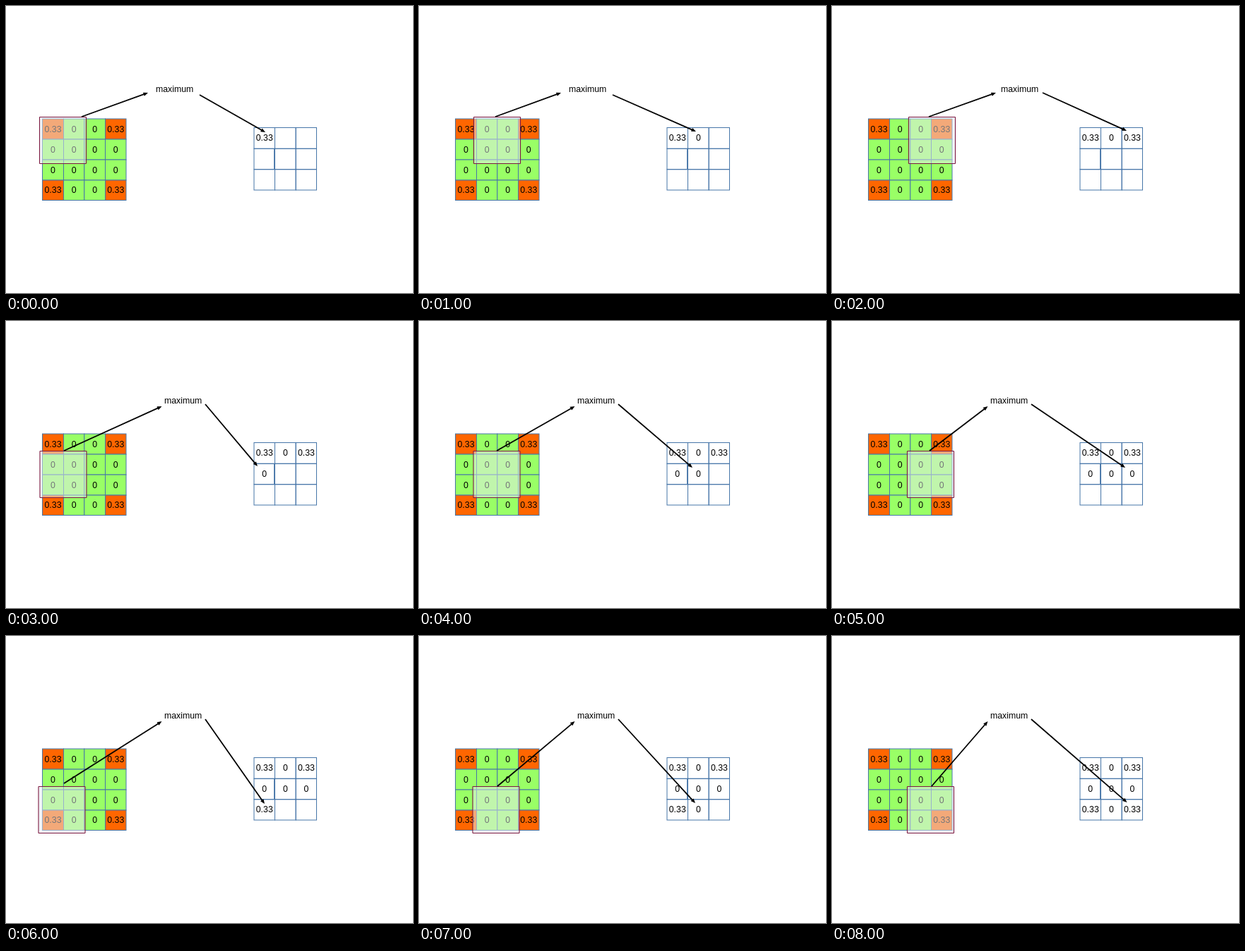
These frames come from a looping animation (576 px wide and 407 px high, 9000 ms). An HTML page:

```html
<!DOCTYPE html>
<html lang="en">
<head>
<meta charset="utf-8">
<title>Max pooling</title>
<style>
  html, body { margin: 0; width: 100%; height: 100%; overflow: hidden; background: #fff; }
  svg { display: block; width: 576px; height: 407px; }
  text { font: 12.3px "Liberation Sans", Arial, sans-serif; fill: #000; }
  .cell { stroke: #4676a8; stroke-width: 1; }
  #win { fill: #e8ecf2; fill-opacity: .5; stroke: #7c1840; stroke-width: 1.1; }
  .arrow line { stroke: #000; stroke-width: 1.8; }
</style>
</head>
<body>
<svg viewBox="0 0 576 407">
  <g id="input"></g>
  <g id="output"></g>
  <rect id="win" width="66" height="66" rx=".5"/>
  <g class="arrow" id="up"><line/><path/></g>
  <g class="arrow" id="down"><line/><path/></g>
  <text id="label">maximum</text>
</svg>
<script>
const STEP = 1000;

// window corner, label baseline start, up arrow, down arrow
const steps = [
  { win: [47.5, 157.5], label: [212, 122], up: [107, 157, 201, 123], down: [274, 126, 367, 179] },
  { win: [77.5, 157.5], label: [212, 122], up: [108, 157, 201, 123], down: [274, 126, 392, 178] },
  { win: [108.5, 157.5], label: [239, 122], up: [137, 157, 232, 123], down: [298, 123, 417, 177] },
  { win: [48, 184.5], label: [224, 117], up: [82, 184, 220.5, 121], down: [282, 118, 356, 206] },
  { win: [77, 184.5], label: [224, 117], up: [110, 184, 220.5, 121], down: [282, 118, 387, 208] },
  { win: [106.5, 184.5], label: [224, 117], up: [138, 184, 220.5, 121], down: [282, 118, 415, 208] },
  { win: [46, 213.5], label: [224, 117], up: [82, 209, 220.5, 121], down: [282, 118, 366, 238] },
  { win: [76, 213.5], label: [224, 117], up: [111, 213, 220.5, 121], down: [282, 118, 391, 237] },
  { win: [106.5, 213.5], label: [224, 117], up: [141, 213, 220.5, 121], down: [282, 118, 417.5, 236] }
];

const $ = id => document.getElementById(id);

function set(el, attrs) {
  for (const key in attrs) el.setAttribute(key, attrs[key]);
  return el;
}

function add(parent, tag, attrs) {
  const el = document.createElementNS("http://www.w3.org/2000/svg", tag);
  return parent.appendChild(set(el, attrs));
}

// Draws a square grid and returns its number labels in reading order.
function grid(parent, xs, ys, value, fill) {
  const n = xs.length - 1;
  const labels = [];
  for (let i = 0; i < n * n; i++) {
    const c = i % n, r = Math.floor(i / n);
    const corner = (r === 0 || r === n - 1) && (c === 0 || c === n - 1);
    add(parent, "rect", {
      class: "cell", x: xs[c], y: ys[r],
      width: xs[c + 1] - xs[c], height: ys[r + 1] - ys[r], fill: fill(corner)
    });
    const text = add(parent, "text", {
      x: (xs[c] + xs[c + 1]) / 2, y: (ys[r] + ys[r + 1]) / 2 + 4, "text-anchor": "middle"
    });
    text.textContent = value(corner);
    labels.push(text);
  }
  return labels;
}

const value = corner => corner ? "0.33" : "0";
grid($("input"), [51.5, 81.5, 110.8, 140.5, 170], [160, 189, 218, 247, 275.5],
  value, corner => corner ? "#ff6600" : "#99ff66");
const results = grid($("output"), [351, 380.5, 410.2, 439.5], [172.5, 202.3, 231.7, 261],
  value, () => "none");
add($("output"), "line", { class: "cell", x1: 379.6, x2: 379.6, y1: 202, y2: 231.5 });

function arrow(g, [x1, y1, x2, y2]) {
  const a = Math.atan2(y2 - y1, x2 - x1);
  set(g.children[0], { x1, y1, x2: x2 - 4 * Math.cos(a), y2: y2 - 4 * Math.sin(a) });
  set(g.children[1], {
    d: "M0 0L-6.5 -2.7V2.7Z",
    transform: `translate(${x2} ${y2}) rotate(${a * 180 / Math.PI})`
  });
}

let shown = -1;

function show(k) {
  if (k === shown) return;
  shown = k;
  const s = steps[k];
  set($("win"), { x: s.win[0], y: s.win[1] });
  set($("label"), { x: s.label[0], y: s.label[1] });
  arrow($("up"), s.up);
  arrow($("down"), s.down);
  results.forEach((t, i) => set(t, { visibility: i <= k ? "visible" : "hidden" }));
}

function tick() {
  show(Math.floor(performance.now() / STEP) % steps.length);
  requestAnimationFrame(tick);
}
show(0);
requestAnimationFrame(tick);
</script>
</body>
</html>
```
